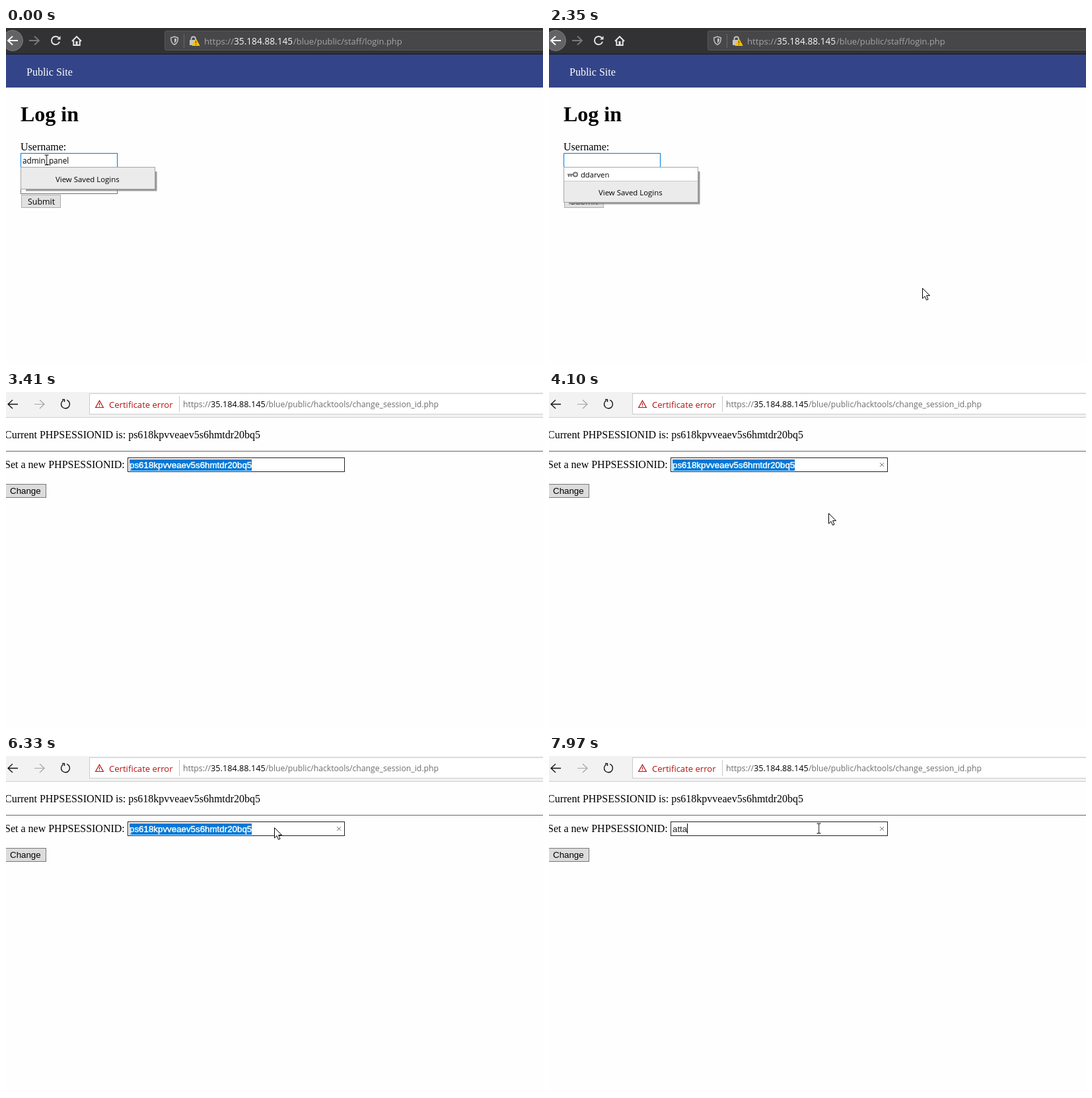
These frames come from a looping animation (813x508 px, 8000 ms). An HTML page:

```html
<!DOCTYPE html>
<html lang="en">
<head>
<meta charset="utf-8">
<title>Session change</title>
<style>
html, body { margin: 0; width: 100%; height: 100%; overflow: hidden; background: #fefefe; }
svg { display: block; width: 813px; height: 508px; }
text { font: 16px "Liberation Serif", serif; }
.ui { font-family: "Open Sans", "Noto Sans", sans-serif; }
.form { font: 13.33px "Liberation Sans", sans-serif; }
.line { fill: none; }
.strong { stroke-width: .45px; }
.soft { filter: drop-shadow(0 1px 2px #0006); }

/* One loop is 8 s; every change is a hard cut. */
.cut { animation: 8s step-end infinite; }
.page1 { animation-name: page1; }
.page2 { animation-name: page2; }
.typed { animation-name: typed; }
.marked { animation-name: marked; }
.endCaret { animation-name: endCaret; }
.startCaret { animation-name: startCaret; }
.small { animation-name: small; }
.large { animation-name: large; }
.focus { animation-name: focus; }
.beam1 { animation-name: beam1; }
.beam2 { animation-name: beam2; }
.clear { animation-name: clear; }
.selected { animation-name: selected; }
.plain { animation-name: plain; }
.menu { animation-name: menu; }
.key1 { animation-name: key1; }
.key2 { animation-name: key2; }
.key4 { animation-name: key4; }
.arrow { animation-name: arrow; }

@keyframes page1 { 0% { opacity: 1 } 42.625%, to { opacity: 0 } }
@keyframes page2 { 0% { opacity: 0 } 42.625%, to { opacity: 1 } }
@keyframes typed { 0% { opacity: 1 } 13.125%, to { opacity: 0 } }
@keyframes marked { 0% { opacity: 0 } 13.125% { opacity: 1 } 16.375%, to { opacity: 0 } }
@keyframes endCaret { 0% { opacity: 0 } 3.25% { opacity: 1 } 9.875%, to { opacity: 0 } }
@keyframes startCaret { 0% { opacity: 0 } 16.375% { opacity: 1 } 22.875%, to { opacity: 0 } }
@keyframes small { 0% { opacity: 1 } 16.375%, to { opacity: 0 } }
@keyframes large { 0% { opacity: 0 } 16.375% { opacity: 1 } 31%, to { opacity: 0 } }
@keyframes focus { 0% { stroke: #0078d7 } 31%, to { stroke: #6f6f6f } }
@keyframes beam1 { 0% { opacity: 1 } 26.125%, to { opacity: 0 } }
@keyframes beam2 { 0% { opacity: 0 } 84.25%, to { opacity: 1 } }
@keyframes clear { 0% { opacity: 0 } 44.5%, to { opacity: 1 } }
@keyframes selected {
  0% { opacity: 1 } 84.25% { opacity: 0 }
  89.375% { opacity: 1 } 94.375%, to { opacity: 0 }
}
@keyframes plain { 0% { opacity: 0 } 84.25% { opacity: 1 } 89.375%, to { opacity: 0 } }
@keyframes menu { 0% { opacity: 0 } 86.125% { opacity: .5 } 87.75% { opacity: 1 } 94.375%, to { opacity: 0 } }
@keyframes key1 { 0% { opacity: 0 } 94.375% { opacity: 1 } 96.25%, to { opacity: 0 } }
@keyframes key2 { 0% { opacity: 0 } 96.25% { opacity: 1 } 99.625%, to { opacity: 0 } }
@keyframes key4 { 0% { opacity: 0 } 99.625%, to { opacity: 1 } }
@keyframes arrow {
  0% { transform: translate(-50px, 0) }
  26.125% { transform: translate(140px, 262px) }
  27.75% { transform: translate(330px, 330px) }
  29.375% { transform: translate(565px, 393px) }
  36% { transform: translate(473px, 455px) }
  37.625% { transform: translate(-50px, 0) }
  46.25% { transform: translate(310px, 402px) }
  47.875% { transform: translate(363px, 232px) }
  49.625% { transform: translate(402px, 205px) }
  51.25% { transform: translate(423px, 183px) }
  63.125% { transform: translate(423px, 177px) }
  64.875% { transform: translate(422px, 163px) }
  66.75% { transform: translate(415px, 128px) }
  68.375% { transform: translate(409px, 100px) }
  70.25% { transform: translate(408px, 110px) }
  71.875% { transform: translate(407px, 117px) }
  79.125% { transform: translate(406px, 108px) }
  84.25%, to { transform: translate(-50px, 0) }
}
</style>
</head>
<body>
<svg viewBox="0 0 813 508">
  <defs>
    <path id="beam" class="line" stroke="#000" d="M-3 -7.5H-1Q0 -7.5 0 -6.5Q0 -7.5 1 -7.5H3M0 -7V7M-3 7.5H-1Q0 7.5 0 6.5Q0 7.5 1 7.5H3"/>
    <path id="back" class="line" d="M8 -6.5L1 0L8 6.5M1 0H16"/>
    <path id="next" class="line" d="M8 -6.5L15 0L8 6.5M15 0H0"/>
  </defs>

  <g class="cut page1">
    <rect width="813" height="40" fill="#323234"/>
    <rect y="39" width="813" height="1" fill="#18181a"/>
    <circle cx="10" cy="19" r="15.5" fill="#636365" stroke="#7c7c7e"/>
    <use href="#back" x="2" y="19" stroke="#f9f9fa" stroke-width="2"/>
    <use href="#next" x="35" y="19" stroke="#7a7a7c" stroke-width="1.8"/>
    <g class="line" stroke="#e4e4e6" stroke-width="2">
      <path d="M80.4 15.6A6.2 6.2 0 1 0 81 20.8"/>
      <path d="M100 20L107 13L114 20M102.3 19V26H111.7V19"/>
    </g>
    <path d="M77 17.5H82.5V12Z" fill="#e4e4e6"/>
    <rect x="105.5" y="20" width="3" height="6" fill="#e4e4e6"/>
    <rect x="240.5" y="4.5" width="590" height="29" rx="2" fill="#474749" stroke="#58585a"/>
    <path class="line" stroke="#c4c4c6" stroke-width="1.5" d="M255 13L260.3 14.7C260.4 20 259 23.5 255 25.3C251 23.5 249.6 20 249.7 14.7Z"/>
    <path fill="#c4c4c6" d="M255 15.5L258 16.5C258 19.5 257.3 21.5 255 23Z"/>
    <rect x="269" y="9" width="1" height="21" fill="#68686a"/>
    <path class="line" stroke="#c4c4c6" stroke-width="1.8" d="M280.5 19V16A3.3 3.3 0 0 1 287 16V19"/>
    <rect x="278" y="18" width="10" height="8" rx="1" fill="#c4c4c6"/>
    <path d="M287.5 16.5L293 26.5H282Z" fill="#ffbf00" stroke="#ffbf00" stroke-linejoin="round"/>
    <path d="M287.5 19.5V23M287.5 24.3V25.5" stroke="#5c4700" stroke-width="1.2"/>
    <g fill="#a5a5a7">
      <text class="ui" x="300" y="25" style="font-size:13.2px">https://</text>
      <text class="ui" x="345" y="25" fill="#f9f9fa" style="font-size:13.7px">35.184.88.145</text>
      <text class="ui" x="435" y="25" style="font-size:12.9px">/blue/public/staff/login.php</text>
    </g>

    <rect y="40" width="813" height="50" fill="#334488"/>
    <text x="31" y="72" fill="#fff">Public Site</text>
    <text x="22" y="141" style="font-size:32px;font-weight:bold">Log in</text>
    <text x="22" y="185">Username:</text>
    <text x="22" y="225">Password:</text>
    <rect class="cut focus" x="22.5" y="189.5" width="146" height="21" fill="#fff"/>
    <rect x="22.5" y="229.5" width="146" height="21" fill="#fff" stroke="#6f6f6f"/>
    <rect x="23.5" y="252.5" width="59" height="19" fill="#e1e1e1" stroke="#adadad"/>
    <text class="ui" x="33" y="267" style="font-size:12.4px">Submit</text>

    <text class="ui cut typed" x="25" y="205" style="font-size:11.7px">admin_panel</text>
    <g class="cut marked">
      <rect x="25" y="192" width="70" height="16" fill="#0078d7"/>
      <text class="ui" x="25" y="205" fill="#fff" style="font-size:11.7px">admin_panel</text>
    </g>
    <rect class="cut endCaret" x="95" y="192" width="1" height="16"/>
    <rect class="cut startCaret" x="25" y="192" width="1" height="16"/>

    <g class="cut small">
      <path d="M30 244H226V217H228.5V246.5H30Z" fill="#888" opacity=".85"/>
      <rect x="22.5" y="210.5" width="203" height="33" fill="#ebebeb" stroke="#a5a5a5"/>
      <text class="ui" x="75" y="233" style="font-size:11.4px">View Saved Logins</text>
    </g>
    <g class="cut large">
      <path d="M30 264H226V217H228.5V266.5H30Z" fill="#888" opacity=".85"/>
      <rect x="22.5" y="210.5" width="203" height="53" fill="#ebebeb" stroke="#a5a5a5"/>
      <rect x="23" y="211" width="202" height="20" fill="#fff"/>
      <rect x="23" y="231" width="202" height="1" fill="#c8c8c8"/>
      <path class="line" stroke="#777" stroke-width="2" d="M28 221.5H37M30 222V225M33.5 222V225"/>
      <circle class="line" cx="40" cy="221.5" r="3" stroke="#777" stroke-width="2"/>
      <text class="ui" x="48" y="226" style="font-size:11.2px">ddarven</text>
      <text class="ui" x="75" y="253" style="font-size:11.4px">View Saved Logins</text>
    </g>
    <use class="cut beam1" href="#beam" x="61.5" y="199.5"/>
  </g>

  <g class="cut page2">
    <rect width="813" height="508" fill="#fefefe"/>
    <rect width="813" height="38" fill="#f2f2f2"/>
    <rect y="38" width="813" height="1" fill="#cfcfcf"/>
    <use href="#back" x="2" y="18.5" stroke="#111" stroke-width="1.3"/>
    <use href="#next" x="43" y="18.5" stroke="#a5a5a5" stroke-width="1.2"/>
    <path class="line" stroke="#111" stroke-width="1.4" d="M86.5 12.8A6.5 6.5 0 1 0 92.2 12.2M85 11.5H88.5V15"/>
    <rect x="126.5" y="2.5" width="700" height="31" fill="#fff" stroke="#cbcbcb"/>
    <path class="line" stroke="#b5120f" stroke-width="1.2" d="M141.5 13L147.3 23.5H135.7ZM141.5 16.5V20M141.5 21V22.3"/>
    <text class="ui" x="156" y="24" fill="#b5120f" style="font-size:13.1px">Certificate error</text>
    <rect x="262" y="6" width="1" height="24" fill="#c8c8c8"/>
    <g fill="#6d6d6d">
      <text class="ui" x="268" y="23" style="font-size:12.3px">https://</text>
      <text class="ui" x="310" y="23" fill="#000" style="font-size:12.7px">35.184.88.145</text>
      <text class="ui" x="393" y="23" style="font-size:12.2px">/blue/public/hacktools/change_session_id.php</text>
    </g>

    <text x="-2" y="70">Current PHPSESSIONID is: ps618kpvveaev5s6hmtdr20bq5</text>
    <rect y="89" width="813" height="1" fill="#666"/>
    <text x="-2" y="115">Set a new PHPSESSIONID:</text>
    <rect x="-2.5" y="139.5" width="63" height="20" fill="#dcdcdc" stroke="#777"/>
    <text class="form" x="6" y="154">Change</text>

    <g class="cut menu">
      <rect class="soft" x="184" y="121" width="329" height="31" fill="#f9f9f9"/>
      <text class="ui strong" x="195" y="139" fill="#222" stroke="#222" style="font-size:12.4px">ps618kpvveaev5s6hmtdr20bq5</text>
    </g>
    <rect x="184.5" y="99.5" width="328" height="21" fill="#fff" stroke="#222"/>
    <path class="line cut clear" stroke="#777" d="M501 107L507 113M507 107L501 113"/>
    <g class="cut selected">
      <rect x="187" y="102" width="185" height="17" fill="#0078d7"/>
      <text class="form strong" x="187" y="115" fill="#fff" stroke="#fff">ps618kpvveaev5s6hmtdr20bq5</text>
    </g>
    <text class="form cut plain" x="187" y="115" fill="#222">ps618kpvveaev5s6hmtdr20bq5</text>
    <g class="cut key1">
      <text class="form" x="187" y="115" fill="#222">a</text>
      <rect x="194" y="102" width="1" height="15"/>
    </g>
    <g class="cut key2">
      <text class="form" x="187" y="115" fill="#222">at</text>
      <rect x="198" y="102" width="1" height="15"/>
    </g>
    <g class="cut key4">
      <text class="form" x="187" y="115" fill="#222">atta</text>
      <rect x="209" y="102" width="1" height="15"/>
    </g>
    <use class="cut beam2" href="#beam" x="408.5" y="109.5"/>
  </g>

  <path class="cut arrow" d="M.5 .5V16L4 12.6L6.5 18.3L9 17.2L6.6 11.6H11.5Z" fill="#fff" stroke="#000"/>
</svg>
</body>
</html>
```
